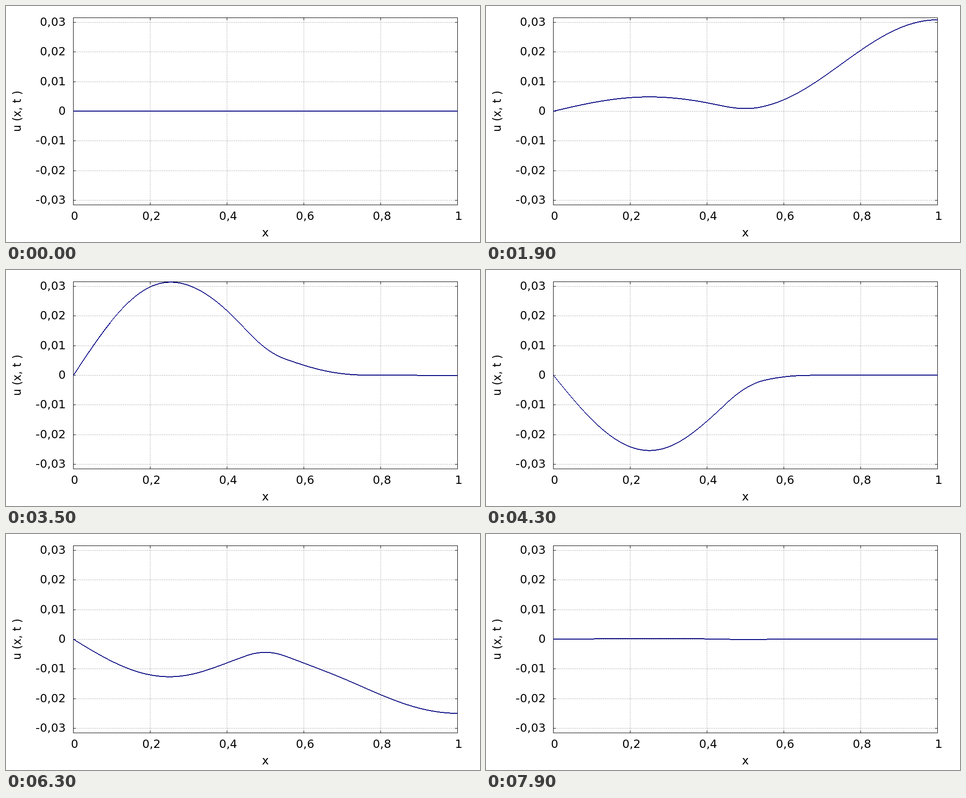
Recreate the animation shown at these times as a matplotlib script. Size 1024 by 512 pixels, loop 8000 ms.

```python
import matplotlib
import matplotlib.pyplot as plt
import numpy as np
from matplotlib.animation import FuncAnimation

matplotlib.rcParams.update({
    "font.family": "DejaVu Sans",
    "text.hinting_factor": 1,
    "path.simplify": False,
})

W, H = 1024, 512
LEFT, RIGHT, TOP, BOTTOM = 145, 975, 25, 431
ZERO, SCALE = 228, 6433          # pixel row of u = 0, pixels per unit of u
FRAMES, INTERVAL = 80, 100
DT, SPEED = 0.05, 1.0005

fig = plt.figure(figsize=(W / 72, H / 72), dpi=72, facecolor="white")
ax = fig.add_axes([0, 0, 1, 1])
ax.set_xlim(0, W)
ax.set_ylim(H, 0)
ax.axis("off")


def segment(xs, ys):
    """Black line, one pixel wide, through pixel centres."""
    ax.plot(np.add(xs, 0.5), np.add(ys, 0.5), color="black", lw=1,
            snap=False, solid_capstyle="projecting",
            solid_joinstyle="miter", zorder=2)


def grid(xs, ys):
    ax.plot(xs, ys, color="#a0a0a0", lw=1, snap=False, dashes=(2, 2),
            dash_capstyle="butt", zorder=1)


def label(value):
    return f"{value:g}".replace(".", ",")


for k in range(6):
    x = LEFT + 166 * k
    if 0 < k < 5:
        grid([x + 0.5, x + 0.5], [BOTTOM + 1, TOP])
    segment([x, x], [BOTTOM, BOTTOM - 5])
    segment([x, x], [TOP, TOP + 5])
    ax.text(x + 3, 464, label(k / 5), size=24.5, ha="center", va="baseline")

for k in range(-3, 4):
    y = round(ZERO - SCALE * k / 100)
    grid([LEFT, RIGHT + 1], [y + 0.5, y + 0.5])
    segment([LEFT, LEFT + 5], [y, y])
    segment([RIGHT, RIGHT - 5], [y, y])
    ax.text(129, y + 8, label(k / 100), size=24.5, ha="right", va="baseline")

segment([LEFT, RIGHT, RIGHT, LEFT, LEFT], [TOP, TOP, BOTTOM, BOTTOM, TOP])
ax.text(560, 500, "x", size=24.5, ha="center", va="baseline")
ax.text(33, 227, "u (x, t )", size=24, rotation=90, rotation_mode="anchor",
        ha="center", va="baseline")

# String fixed at x = 0 and free at x = 1, driven by sin(2 pi t) on
# 0.45 < x < 0.55; the ends are handled with mirrored sources.
columns = np.arange(LEFT, RIGHT + 1)
x = (columns - LEFT) / (RIGHT - LEFT)
offsets = (np.arange(20) + 0.5) / 200 - 0.05
centres = np.arange(-4, 5) + 0.5
signs = np.sign(np.sin(np.pi / 2 * centres))
sources = centres[:, None] + offsets
delays = np.abs(x[:, None, None] - sources) / SPEED


def displacement(t):
    s = np.maximum(t - delays, 0)
    wave = (1 - np.cos(2 * np.pi * s)) / (4 * np.pi)
    return 0.1 * wave.mean(axis=2) @ signs


def band(t):
    """Top and bottom pixel edges of the curve in every column."""
    y = ZERO + 0.25 - SCALE * displacement(t)
    slope = np.abs(np.gradient(y))
    height = np.round(2 * np.maximum(slope, 1))
    top = np.floor(y + 0.5) - height // 2
    return top, top + height


edges = np.append(columns, RIGHT + 1)
top, bottom = band(0)
curve = ax.stairs(top, edges, baseline=bottom, fill=True, color="#000080",
                  lw=0, antialiased=False, snap=False, zorder=3)
ax.set_xlim(0, W)
ax.set_ylim(H, 0)


def update(i):
    top, bottom = band(i * DT)
    curve.set_data(top, edges, bottom)
    return curve,


anim = FuncAnimation(fig, update, frames=FRAMES, interval=INTERVAL,
                     repeat=True, repeat_delay=0, blit=False)
plt.show()
```
